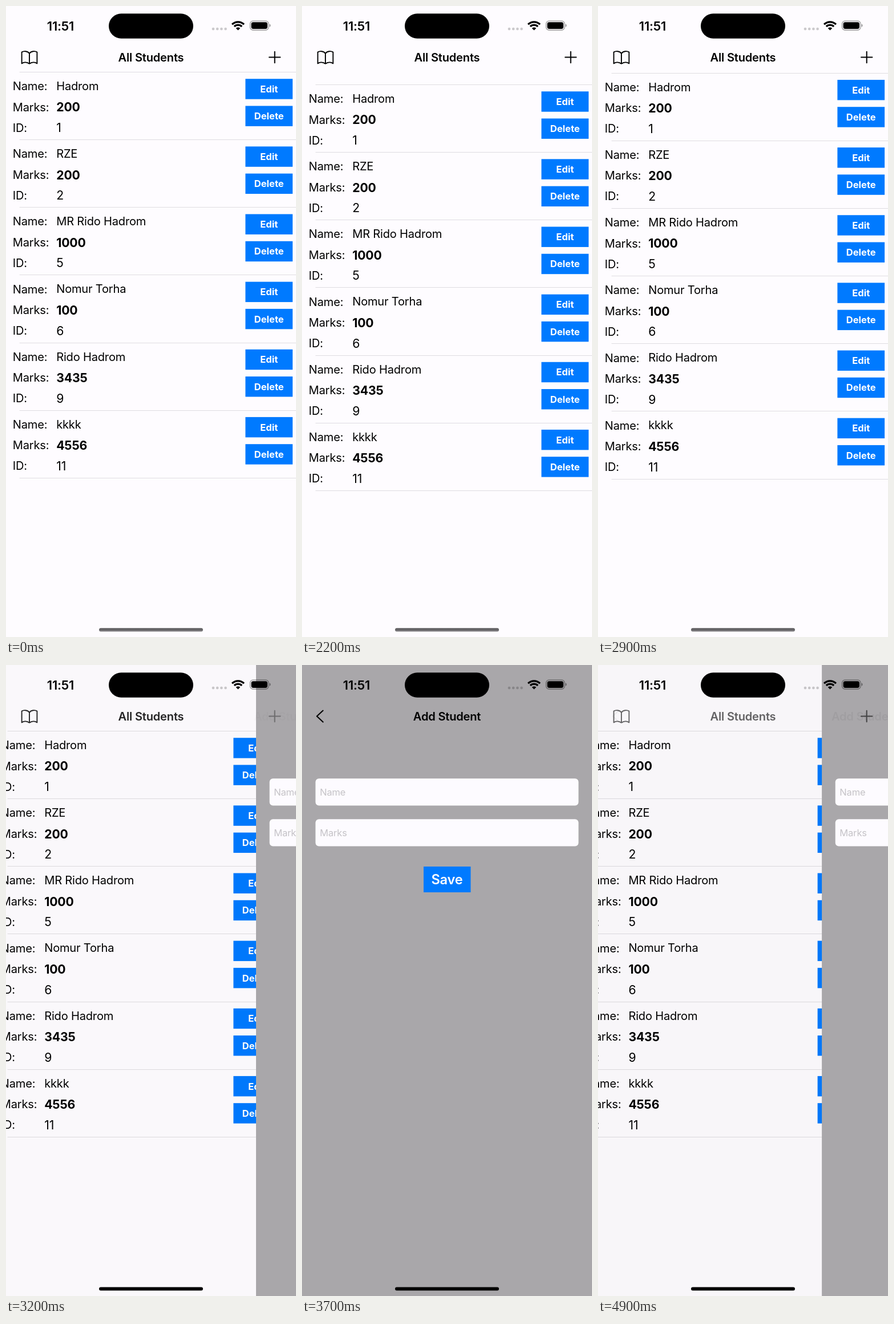
Write an HTML page with a canvas that moves like this. It is 508 px wide and 1102 px high and loops after 5 s.

```html
<!DOCTYPE html>
<html lang="en">
<head>
<meta charset="utf-8">
<title>Student list</title>
<style>
  html, body { margin: 0; width: 100%; height: 100%; overflow: hidden; background: #fefcff; }
  canvas { display: block; width: 508px; height: 1102px; }
</style>
</head>
<body>
<canvas id="stage" width="508" height="1102"></canvas>
<script>
const ctx = document.getElementById('stage').getContext('2d');
const W = 508, H = 1102, LOOP = 5000, STEP = 100;
const PT = W / 430;
const LIST_TOP = 115.4, ROW = 100 * PT;
const PAPER = '#fefcff', GREY = '#a9a7aa', BLUE = '#007aff', INK = '#000';

const students = [
  ['Hadrom', 200, 1],
  ['RZE', 200, 2],
  ['MR Rido Hadrom', 1000, 5],
  ['Nomur Torha', 100, 6],
  ['Rido Hadrom', 3435, 9],
  ['kkkk', 4556, 11],
];

// Timing
const clamp = v => Math.max(0, Math.min(1, v));

function spring(ms, omega) {
  const x = omega * Math.max(0, ms) / 1000;
  return 1 - (1 + x) * Math.exp(-x);
}

function scrollAt(t) {
  if (t < 1600 || t >= 3000) return 0;
  if (t < 1900) return -38.7;
  if (t < 2400) {
    const left = 1 - clamp((t - 1800) / 400);
    return 22 - 60.7 * left * left;
  }
  return 37 * (1 - spring(t - 2450, 10.7));
}

// How much of the stage the form page covers, 0 to 1
function coverAt(t) {
  if (t >= 4739) return 1 - spring(t - 4739, 17.5);
  return t >= 3700 ? 1 : spring(t - 3163, 17.5);
}

// Drawing helpers
function text(str, x, y, size, weight = 400, color = INK, align = 'left', spacing = -0.2) {
  ctx.font = `${weight} ${size}px Inter, sans-serif`;
  ctx.letterSpacing = spacing + 'px';
  ctx.textAlign = align;
  ctx.fillStyle = color;
  ctx.fillText(str, x, y);
}

function rect(x, y, w, h, color) {
  ctx.fillStyle = color;
  ctx.fillRect(x, y, w, h);
}

function pill(x, y, w, h, r, color) {
  ctx.beginPath();
  ctx.roundRect(x, y, w, h, r);
  ctx.fillStyle = color;
  ctx.fill();
}

function stroke(width, build) {
  ctx.beginPath();
  build();
  ctx.lineWidth = width;
  ctx.strokeStyle = INK;
  ctx.stroke();
}

function withAlpha(alpha, draw) {
  if (alpha <= 0) return;
  ctx.save();
  ctx.globalAlpha = Math.min(1, alpha);
  draw();
  ctx.restore();
}

function shifted(dx, dy, draw) {
  ctx.save();
  ctx.translate(dx, dy);
  draw();
  ctx.restore();
}

// List page
function rowButton(label, y) {
  rect(355 * PT, y, 70 * PT, 30 * PT, BLUE);
  text(label, 390 * PT, y + 23.7, 14 * PT, 700, '#fff', 'center', 0);
}

function separator(y) {
  rect(20 * PT, Math.round(y - 0.4), W, 1, '#dfdde1');
}

function row([name, marks, id], y) {
  separator(y);
  const label = 10 * PT, value = 88.2, size = 17 * PT;
  text('Name:', label, y + 31.8, size);
  text(name, value, y + 31.6, size);
  text('Marks:', label, y + 68.2, size);
  text(marks, value, y + 69, 18 * PT, 700);
  text('ID:', label, y + 104.2, size);
  text(id, value, y + 104.8, 18 * PT);
  rowButton('Edit', y + 10 * PT);
  rowButton('Delete', y + 50 * PT);
}

function listPage(scroll) {
  rect(0, 0, W, H, PAPER);
  const top = LIST_TOP + scroll;
  students.forEach((student, i) => row(student, top + i * ROW));
  separator(top + students.length * ROW);
  if (scroll < 0) {
    rect(0, 0, W, 115, '#f6f5f7');
    rect(0, 115, W, 1, '#d3d1d5');
  }
}

// Form page
function field(label, y) {
  pill(20 * PT, y, 390 * PT, 40 * PT, 6, '#fdfbff');
  text(label, 31.2, y + 29.6, 14 * PT, 400, '#c5c3c7');
}

function formPage() {
  rect(0, 0, W, H, GREY);
  field('Name', 198.3);
  field('Marks', 269.3);
  rect(213, 352, 82.5, 45, BLUE);
  text('Save', 254, 383, 20 * PT, 600, '#fff', 'center');
}

// Navigation bar
function bookIcon() {
  ctx.lineJoin = 'round';
  stroke(1.9, () => {
    for (const side of [-1, 1]) {
      ctx.moveTo(41, 83);
      ctx.bezierCurveTo(41 + side * 3, 78.6, 41 + side * 10, 78.2, 41 + side * 13.4, 80.6);
      ctx.lineTo(41 + side * 13.4, 100.4);
      ctx.bezierCurveTo(41 + side * 10, 97.6, 41 + side * 4, 97.6, 41, 101);
    }
    ctx.moveTo(41, 83);
    ctx.lineTo(41, 101);
  });
}

function plusIcon() {
  ctx.lineCap = 'round';
  stroke(2, () => {
    ctx.moveTo(461, 89.5);
    ctx.lineTo(480.4, 89.5);
    ctx.moveTo(470.7, 79.8);
    ctx.lineTo(470.7, 99.2);
  });
}

function backIcon() {
  ctx.lineCap = ctx.lineJoin = 'round';
  stroke(2.1, () => {
    ctx.moveTo(36.8, 79.6);
    ctx.lineTo(26, 89.6);
    ctx.lineTo(36.8, 99.6);
  });
}

function navTitle(str, x) {
  text(str, x, 96.8, 17 * PT, 600, INK, 'center');
}

function navBar(cover, pressed) {
  const oldAlpha = 1 - (cover / 0.36) ** 2;
  const newAlpha = cover * cover;
  withAlpha(oldAlpha, () => {
    bookIcon();
    navTitle('All Students', W / 2);
  });
  withAlpha(oldAlpha * (pressed ? 0.4 : 1), plusIcon);
  withAlpha(newAlpha, () => {
    backIcon();
    navTitle('Add Student', W / 2 + 0.546 * W * (1 - cover));
  });
}

// Status bar and home indicator
function wifiIcon() {
  const x = 406.5, y = 42.6, from = -Math.PI * 0.75, to = -Math.PI * 0.25;
  for (const radius of [14.8, 9.4]) {
    stroke(3.2, () => ctx.arc(x, y, radius, from, to));
  }
  ctx.beginPath();
  ctx.moveTo(x, y);
  ctx.arc(x, y, 5.4, from, to);
  ctx.fillStyle = INK;
  ctx.fill();
}

function statusBar() {
  text('11:51', 95.5, 42.8, 22, 600, INK, 'center');
  pill(180, 13.3, 148, 43.4, 21.7, INK);
  for (let i = 0; i < 4; i++) pill(360.8 + i * 7.2, 37.8, 4.4, 4.4, 1.6, 'rgba(0,0,0,.2)');
  wifiIcon();
  withAlpha(0.42, () => {
    stroke(1.3, () => ctx.roundRect(427.6, 26.2, 32.4, 15.8, 5));
    pill(461.6, 31.6, 1.8, 5, [0, 2, 2, 0], INK);
  });
  pill(429.6, 28.2, 28.4, 11.8, 3.4, INK);
}

function homeIndicator(dark) {
  let color = '#050505';
  if (!dark) {
    color = ctx.createLinearGradient(0, 1086.5, 0, 1092.5);
    color.addColorStop(0, '#515052');
    color.addColorStop(1, '#848286');
  }
  pill(163, 1086.6, 182, 5.8, 2.9, color);
}

function draw(t) {
  const cover = coverAt(t);
  ctx.clearRect(0, 0, W, H);
  shifted(-0.3 * W * cover, 0, () => listPage(scrollAt(t)));
  if (cover > 0) {
    // The list slides slower than the form, so fill what it uncovers.
    rect(W * (1 - 0.3 * cover), 0, W, H, PAPER);
    rect(0, 0, W, H, `rgba(0,0,0,${0.1 * cover})`);
    shifted(W * (1 - cover), 0, formPage);
  }
  navBar(cover, t >= 3100 && t < 3700);
  statusBar();
  homeIndicator(t >= 3100);
}

function tick(now) {
  draw(Math.floor((now % LOOP) / STEP) * STEP);
  requestAnimationFrame(tick);
}

draw(0);
requestAnimationFrame(tick);
</script>
</body>
</html>
```
